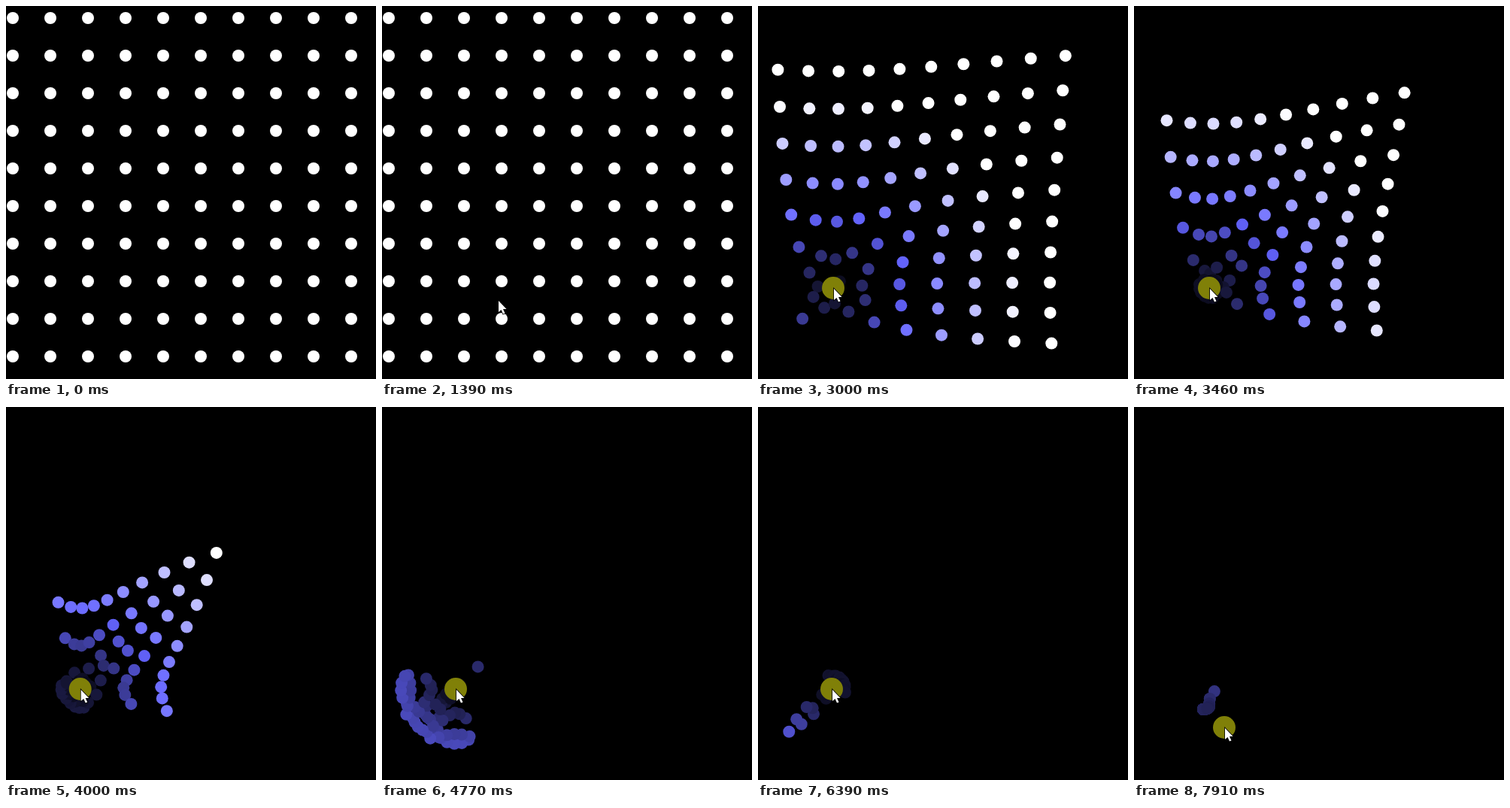
An HTML page without scripts that plays this animation: 492 px wide and 496 px high, repeating every 7990 ms.

```html
<!DOCTYPE html>
<html lang="en">
<head>
<meta charset="utf-8">
<title>Dots and attractor</title>
<style>
/* shared clock and attractor state */
@property --t { syntax: "<number>"; inherits: true; initial-value: 0 }
@property --fall { syntax: "<number>"; inherits: true; initial-value: 0 }
@property --on { syntax: "<number>"; inherits: true; initial-value: 0 }
@property --drag { syntax: "<number>"; inherits: true; initial-value: 0 }
@property --cx { syntax: "<number>"; inherits: true; initial-value: 100 }
@property --cy { syntax: "<number>"; inherits: true; initial-value: 375 }
/* per-dot values */
@property --dx { syntax: "<number>"; inherits: false; initial-value: 0 }
@property --dy { syntax: "<number>"; inherits: false; initial-value: 0 }
@property --reach { syntax: "<number>"; inherits: false; initial-value: 1 }
@property --peak { syntax: "<number>"; inherits: false; initial-value: 1 }
@property --past { syntax: "<number>"; inherits: false; initial-value: 0 }
@property --rise { syntax: "<number>"; inherits: false; initial-value: 1 }
@property --swing { syntax: "<number>"; inherits: false; initial-value: 0 }
@property --past2 { syntax: "<number>"; inherits: false; initial-value: 0 }
@property --rise2 { syntax: "<number>"; inherits: false; initial-value: 1 }
@property --swing2 { syntax: "<number>"; inherits: false; initial-value: 0 }
@property --n { syntax: "<number>"; inherits: false; initial-value: 1 }
@property --far { syntax: "<number>"; inherits: false; initial-value: 0 }
@property --px { syntax: "<number>"; inherits: false; initial-value: 0 }
@property --py { syntax: "<number>"; inherits: false; initial-value: 0 }
@property --d { syntax: "<number>"; inherits: false; initial-value: 255 }

html, body { margin: 0; width: 100%; height: 100%; overflow: hidden; background: #000 }

.stage {
  position: relative; width: 492px; height: 496px; overflow: hidden; background: #000;
  animation: clock 7.99s steps(104) -10ms infinite;
  --fall: max(0, var(--t) - 1.866);
  --on: clamp(0, (var(--t) - 1.8) * 1000, 1);
  --drag: clamp(0, (var(--t) - 7.61) / .303, 1);
  --cx: calc(100 - 2 * clamp(0, (var(--t) - 3.6) / .6, 1) + 22 * var(--drag));
  --cy: calc(375 + 51 * var(--drag));
}
@keyframes clock { from { --t: 0 } to { --t: 7.99 } }

.stage > * > i:nth-child(1) { --i: 0 }
.stage > * > i:nth-child(2) { --i: 1 }
.stage > * > i:nth-child(3) { --i: 2 }
.stage > * > i:nth-child(4) { --i: 3 }
.stage > * > i:nth-child(5) { --i: 4 }
.stage > * > i:nth-child(6) { --i: 5 }
.stage > * > i:nth-child(7) { --i: 6 }
.stage > * > i:nth-child(8) { --i: 7 }
.stage > * > i:nth-child(9) { --i: 8 }
.stage > * > i:nth-child(10) { --i: 9 }

i {
  position: absolute; left: -8px; top: -8px; width: 16px; height: 16px; border-radius: 50%;
  --dx: calc(50 * var(--i) - 91);
  --dy: calc(50 * var(--j) - 359);
  --reach: hypot(var(--dx), var(--dy));

  /* constant pull inward, braked overshoot, fall back, smaller overshoot */
  --peak: max(.12 * var(--reach), min(.37 * var(--reach) - 53, .19 * var(--reach) + 28));
  --past: calc(var(--fall) - sqrt(var(--reach)) / 7.45);
  --rise: calc(.1074 * var(--peak) / sqrt(var(--reach)));
  --swing: max(0, var(--peak) * (1 - pow(1 - clamp(0, var(--past) / var(--rise), 1), 1.6))
    - 55.5 * pow(max(0, var(--past) - var(--rise)), 2));
  --past2: calc(var(--past) - var(--rise) - sqrt(var(--peak) / 55.5));
  --rise2: calc(.0236 * sqrt(var(--peak)));
  --swing2: max(0, .22 * var(--peak) * (1 - pow(1 - clamp(0, var(--past2) / var(--rise2), 1), 1.6))
    - 55.5 * pow(max(0, var(--past2) - var(--rise2)), 2));
  --n: calc((max(0, var(--reach) - 55.5 * var(--fall) * var(--fall)) - var(--swing) + var(--swing2)) / var(--reach));

  /* trail left behind while the attractor is dragged away */
  --far: clamp(0, (var(--reach) - 300) / 208, 1);
  --px: calc((var(--cx) - 22 * var(--drag) + var(--dx) * var(--n)) * (1 - var(--drag))
    + (92 + 8 * min(1, 2 * var(--far)) + 7 * pow(var(--far), 12)) * var(--drag));
  --py: calc((375 + var(--dy) * var(--n)) * (1 - var(--drag))
    + (402 - 24 * pow(var(--far), 3)) * var(--drag));

  --d: calc(hypot(var(--px) - var(--cx), var(--py) - var(--cy)) + 255 * (1 - var(--on)));
  background: rgb(min(255, var(--d)), min(255, var(--d)), min(255, 2.55 * var(--d)));
  transform: translate(calc(var(--px) * 1px), calc(var(--py) * 1px));
}

.pull {
  position: absolute; left: -15px; top: -15px; width: 30px; height: 30px; border-radius: 50%;
  background: #808008; opacity: var(--on);
  transform: translate(calc(var(--cx) * 1px), calc(var(--cy) * 1px));
}

.cursor {
  position: absolute; left: 1px; top: 1px; width: 12px; height: 19px; overflow: visible;
  --a: (1 - clamp(0, (var(--t) - .65) / .73, 1));
  --b: (1 - clamp(0, (var(--t) - 1.4) / .35, 1));
  transform: translate(calc((var(--cx) + 60 * var(--a) + 54 * var(--b)) * 1px),
    calc((var(--cy) + 108 * var(--a) + 16 * var(--b)) * 1px));
}
</style>
</head>
<body>
<div class="stage">
<div style="--j:0"><i></i><i></i><i></i><i></i><i></i><i></i><i></i><i></i><i></i><i></i></div>
<div style="--j:1"><i></i><i></i><i></i><i></i><i></i><i></i><i></i><i></i><i></i><i></i></div>
<div style="--j:2"><i></i><i></i><i></i><i></i><i></i><i></i><i></i><i></i><i></i><i></i></div>
<div style="--j:3"><i></i><i></i><i></i><i></i><i></i><i></i><i></i><i></i><i></i><i></i></div>
<div style="--j:4"><i></i><i></i><i></i><i></i><i></i><i></i><i></i><i></i><i></i><i></i></div>
<div style="--j:5"><i></i><i></i><i></i><i></i><i></i><i></i><i></i><i></i><i></i><i></i></div>
<div style="--j:6"><i></i><i></i><i></i><i></i><i></i><i></i><i></i><i></i><i></i><i></i></div>
<div style="--j:7"><i></i><i></i><i></i><i></i><i></i><i></i><i></i><i></i><i></i><i></i></div>
<div style="--j:8"><i></i><i></i><i></i><i></i><i></i><i></i><i></i><i></i><i></i><i></i></div>
<div style="--j:9"><i></i><i></i><i></i><i></i><i></i><i></i><i></i><i></i><i></i><i></i></div>
<div class="pull"></div>
<svg class="cursor" viewBox="0 0 12 19"><path d="M0 0V15L3.5 12L6 17.5L8.5 16.5L6 11H10.5Z" fill="#fff" stroke="#000" stroke-width="1.6" paint-order="stroke"/></svg>
</div>
</body>
</html>
```
